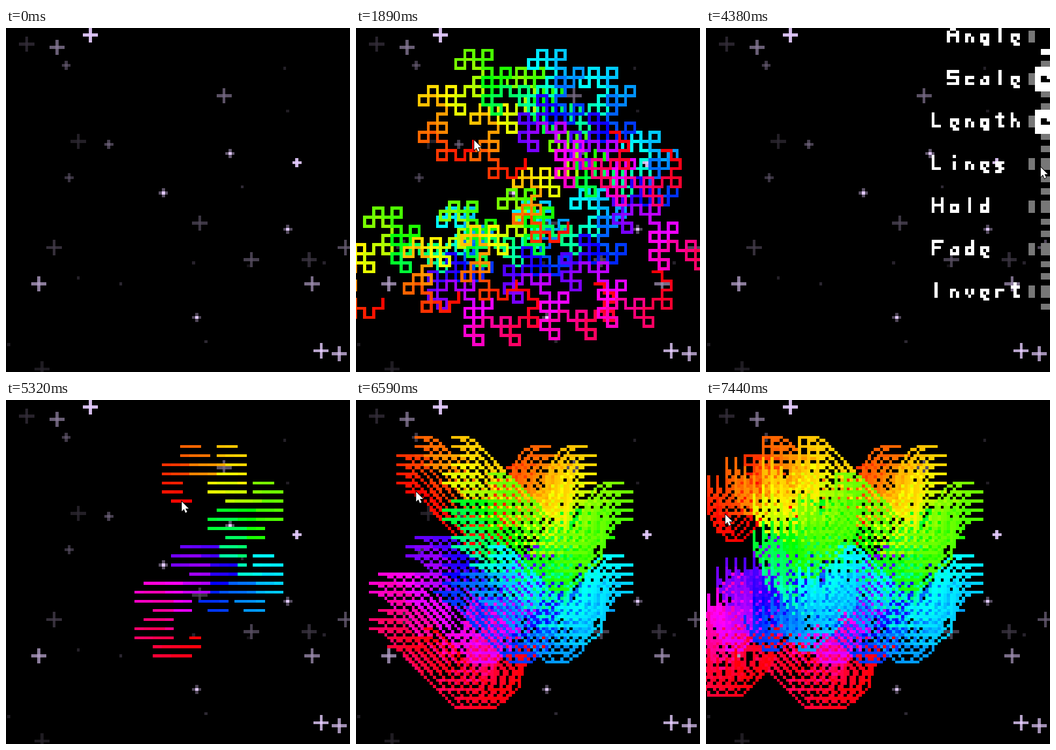
These frames come from a looping animation (640 px wide and 640 px high, 7540 ms). An HTML page with a canvas:

```html
<!DOCTYPE html>
<html lang="en">
<head>
<meta charset="utf-8">
<title>Dragon curve brush</title>
<style>
html, body { margin: 0; width: 100%; height: 100%; overflow: hidden; background: #000; }
canvas { display: block; }
</style>
</head>
<body>
<canvas id="stage" width="640" height="640" aria-label="Dragon curve brush on a starry sky"></canvas>
<script>
const SIZE = 640, LOOP = 7540, TICK = 57.3, MENU_ON = 2500, MENU_OFF = 4670;
const SWEEP_FROM = 5320, SWEEPS = 37;

const layer = () => {
  const c = document.createElement('canvas');
  c.width = c.height = SIZE;
  return c.getContext('2d');
};
const view = document.getElementById('stage').getContext('2d');
const sky = layer(), paint = layer(), menu = layer();

// Art cells are a little over five pixels wide, snapped to whole pixels.
const CELL = SIZE * 3 / 340, LEFT = 1.88, TOP = -0.94;
const edge = (n, from) => Math.round(n * CELL + from);
function cell(g, x, y, color, w = 1, h = 1) {
  const px = edge(x, LEFT), py = edge(y, TOP);
  g.fillStyle = color;
  g.fillRect(px, py, edge(x + w, LEFT) - px, edge(y + h, TOP) - py);
}
const toCell = ([x, y]) => [Math.floor((x - LEFT) / CELL), Math.floor((y - TOP) / CELL)];

// Stars run from bright to dim within each group.
const BIG = [[27, 2], [103, 106], [109, 107], [10, 84], [100, 84], [16, 6], [71, 22], [111, 72],
  [80, 76], [63, 64], [15, 72], [99, 76], [6, 5], [23, 37], [11, 112]];
const SMALL = [[95, 44], [73, 41], [51, 54], [92, 66], [62, 95], [33, 38], [19, 12], [20, 49]];

const lilac = b => `rgb(${b * 2.25},${b * 2},${b * 2.5})`;
function star([x, y], arm, b, core) {
  cell(sky, x - arm, y, lilac(b), arm * 2 + 1);
  cell(sky, x, y - arm, lilac(b), 1, arm * 2 + 1);
  cell(sky, x, y, lilac(Math.min(100, core)));
}
function drawSky() {
  let seed = 7;
  const rand = n => Math.floor((seed = seed * 16807 % 2147483647) / 2147483647 * n);
  sky.fillStyle = '#000';
  sky.fillRect(0, 0, SIZE, SIZE);
  for (let k = 0; k < 10; k++) star([rand(113), rand(113)], 0, 0, 10 + rand(12));
  BIG.forEach((p, k) => star(p, 2, 94 * 0.87 ** k, 115 * 0.87 ** k));
  SMALL.forEach((p, k) => star(p, 1, k ? 46 - k * 3 : 92, k < 5 ? 100 : 70 - k * 5));
}

// Glyph: x offset, y offset, rows
const GLYPHS = {
  A: [0, 0, '.##./#..#/####/#..#/#..#'], S: [0, 0, '####/#.../####/...#/####'],
  L: [0, 0, '#/#/#/#/###'], H: [0, 0, '#..#/#..#/####/#..#/#..#'],
  F: [0, 0, '####/#/###/#/#'], I: [1, 0, '#/#/#/#/#'],
  n: [1, 2, '##./#.#/#.#'], g: [1, 2, '###/#.#/###/.##'], l: [2, 0, '#/#/#/#/#'],
  e: [1, 2, '###/#.#/##./.##'], c: [1, 2, '###/#/###'], a: [1, 2, '.##/#.#/###'],
  t: [1, 0, '.#/###/.#/.#/.##'], h: [1, 0, '#/#/##/#.#/#.#'], i: [2, 0, '#/./#/#/#'],
  s: [1, 2, '###/##/.##/##'], o: [1, 2, '###/#.#/###'], d: [1, 0, '..#/..#/###/#.#/###'],
  v: [1, 2, '#.#/#.#/.#'], r: [1, 2, '###/#/#']
};
function write(text, x, y) {
  [...text].forEach((ch, k) => {
    if (ch === ' ') return;
    const [dx, dy, rows] = GLYPHS[ch];
    rows.split('/').forEach((row, r) => [...row].forEach((p, c) => {
      if (p === '#') cell(menu, x + k * 5 + dx + c, y + dy + r, '#fff');
    }));
  });
}
function drawMenu() {
  const gray = '#777';
  [' Angle', ' Scale', 'Length', 'Lines', 'Hold', 'Fade', 'Invert'].forEach((label, k) => {
    const y = k * 14;
    write(label, 74, y);
    cell(menu, 106, y + 1, gray, 2, 4);
    cell(menu, 110, y + 7, k ? gray : '#fff', 4, 2);
    if (k < 6) cell(menu, 110, y + 11, gray, 4, 2);
    if (k > 2) cell(menu, 110, y + 1, gray, 4, 4);
    if (k === 1 || k === 2) {
      cell(menu, 108, y - 1, '#fff', 6, 8);
      cell(menu, 110, y + 2, '#000', 2);
      cell(menu, 110, y + 3, '#000', 4);
    }
  });
}

// Dragon curve vertices, measured from the first turn
const COUNT = 255, dragon = [];
for (let i = 1, x = 0, y = 0, dx = 3, dy = 0; i <= COUNT; i++) {
  dragon.push([x, y]);
  [dx, dy] = ((i & -i) << 1) & i ? [dy, -dx] : [-dy, dx];
  x += dx;
  y += dy;
}
const hue = i => `hsl(${i / COUNT * 360},100%,50%)`;

function line(x0, y0, x1, y1, color) {
  const n = Math.max(Math.abs(x1 - x0), Math.abs(y1 - y0), 1);
  for (let k = 0; k <= n; k++) {
    cell(paint, Math.round(x0 + (x1 - x0) * k / n), Math.round(y0 + (y1 - y0) * k / n), color);
  }
}
function stamp([x, y]) {
  for (let i = 1; i < COUNT; i++) {
    const [ax, ay] = dragon[i - 1], [bx, by] = dragon[i];
    line(x + ax, y + ay, x + bx, y + by, hue(i));
  }
}
// The curve is turned a quarter here and each vertex follows the pointer.
function sweep([x0, y0], [x1, y1]) {
  dragon.forEach(([x, y], i) => line(x0 - y, y0 + x, x1 - y, y1 + x, hue(i)));
}

// Key points [time, x, y], joined by smooth curves
const STAMPS = [[610, 50, 504], [960, 191, 493], [1370, 298, 471], [1540, 394, 363], [1715, 315, 245], [1882, 220, 209]];
const STROKE = [[4380, 622, 259], [5090, 364, 190], [5262, 344, 189], [5320, 327, 189], [5430, 304, 204],
  [5550, 293, 232], [5700, 282, 262], [5836, 264, 281], [5950, 238, 283], [6065, 213, 263],
  [6300, 166, 212], [6460, 138, 176], [6580, 112, 171], [6700, 107, 180], [6860, 101, 216],
  [7090, 75, 253], [7200, 58, 263], [7440, 36, 213]];
const ROUTES = [
  [[250, 28, 598], [420, 52, 487], ...STAMPS, [2500, 660, 100]],
  [[3120, 632, 34], [3300, 614, 75], [3480, 645, 107]],
  [[3790, 636, 257], [4380, 622, 259]],
  STROKE
];

function smooth(keys, t) {
  const last = keys.length - 1;
  const k = Math.min(last, Math.max(1, keys.findIndex(p => p[0] >= t)));
  const a = keys[k - 1], b = keys[k], span = b[0] - a[0], f = (t - a[0]) / span;
  const slope = (i, axis) => {
    const p = keys[Math.max(0, i - 1)], q = keys[Math.min(last, i + 1)];
    return (q[axis] - p[axis]) / (q[0] - p[0]) * span;
  };
  return [1, 2].map(axis => {
    const d = b[axis] - a[axis], m = slope(k - 1, axis), n = slope(k, axis);
    return a[axis] + f * (m + f * (3 * d - 2 * m - n + f * (m + n - 2 * d)));
  });
}
function pointer(t) {
  const route = ROUTES.find(r => t >= r[0][0] && t <= r[r.length - 1][0]);
  return route && smooth(route, t);
}
const tick = t => SWEEP_FROM + Math.floor((t - SWEEP_FROM) / TICK + 1e-6) * TICK;
const strokeAt = t => smooth(STROKE, Math.min(t, 7440));

const wipe = () => paint.clearRect(0, 0, SIZE, SIZE);
const events = STAMPS.map(([t, x, y]) => [t, () => stamp(toCell([x, y]))]);
events.push([MENU_ON, wipe]);
for (let k = 0; k <= SWEEPS; k++) {
  const t = SWEEP_FROM + k * TICK;
  events.push([t - 0.2, () => sweep(toCell(strokeAt(t - TICK)), toCell(strokeAt(t)))]);
}

const ARROW = [[0, 0], [0, 18], [4, 14], [7, 21], [10, 19], [7, 13], [13, 13]];
function drawPointer([x, y]) {
  view.save();
  view.translate(x, y);
  view.beginPath();
  ARROW.forEach(p => view.lineTo(...p));
  view.closePath();
  view.strokeStyle = '#000';
  view.lineWidth = 2;
  view.stroke();
  view.fillStyle = '#fff';
  view.fill();
  view.restore();
}

let next = 0, last = 0;
function render(t) {
  if (t < last) {
    wipe();
    next = 0;
  }
  last = t;
  while (next < events.length && events[next][0] <= t) events[next++][1]();
  view.drawImage(sky.canvas, 0, 0);
  view.drawImage(paint.canvas, 0, 0);
  if (t >= MENU_ON && t < MENU_OFF) view.drawImage(menu.canvas, 0, 0);
  const p = t >= 250 && pointer(Math.min(7440, Math.max(250, tick(t))));
  if (p) drawPointer(p);
}

drawSky();
drawMenu();
const start = performance.now();
function loop() {
  render((performance.now() - start) % LOOP);
  requestAnimationFrame(loop);
}
loop();
</script>
</body>
</html>
```
